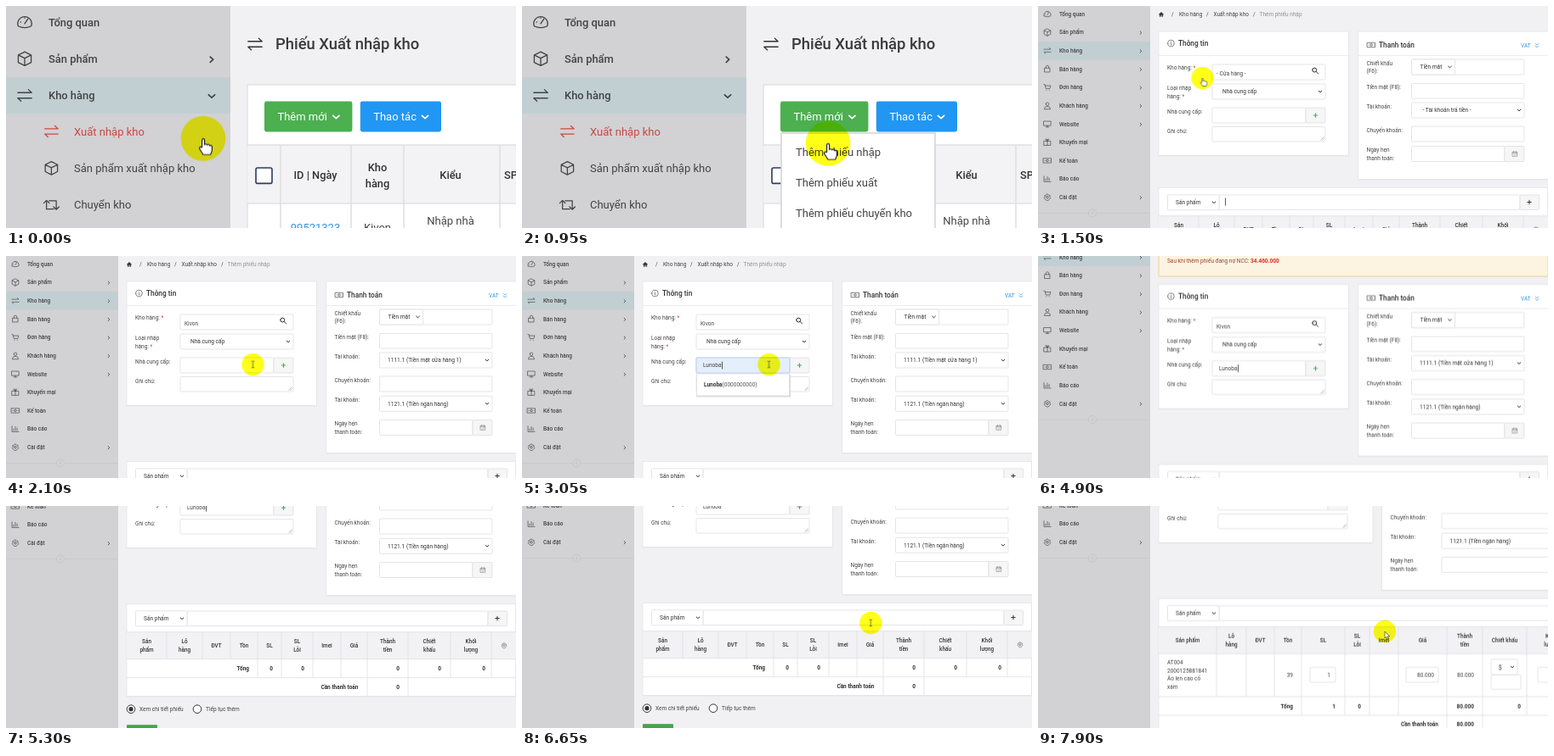
An HTML page that plays this animation: 600x262 px, repeating every 8000 ms.

```html
<!DOCTYPE html>
<html lang="vi">
<head>
<meta charset="utf-8">
<title>Phiếu nhập kho</title>
<style>
html, body { margin: 0; width: 100%; height: 100%; overflow: hidden; background: #f1f0f2; }
svg { display: block; width: 100%; height: 100%; }
text { font: 6.5px Roboto, sans-serif; fill: #444; white-space: pre; }
.menu { font-weight: 500; font-size: 6.45px; fill: #444; }
.title { font-size: 8.3px; font-weight: 500; fill: #333; }
.big { font-size: 9.2px; font-weight: 500; fill: #3a3a3a; }
.bold { font-weight: 700; fill: #333; }
.head { font-weight: 500; font-size: 6.4px; fill: #333; }
.choice { font-size: 6.6px; fill: #333; }
.red { fill: #c64a42; }
.blue { fill: #2f93e0; }
.faint { fill: #939397; }
.white { fill: #fff; }
.warn { fill: #98402f; }
.icon { fill: none; stroke: #444; stroke-width: .7; stroke-linecap: round; stroke-linejoin: round; }
.circle { fill: #ffff18; mix-blend-mode: multiply; }
.pointer path { fill: #fff; stroke: #222; stroke-width: .6; stroke-linejoin: round; }
</style>
</head>
<body>
<script>
const LOOP = 8000, STORE = 'Kivon', SUPPLIER = 'Lunoba';
const ICONS = {
  gauge: 'M-4 2.5A4.3 4.3 0 1 1 4 2.5Q0 4.5-4 2.5M0 1 2-2M-2.5 0h.1M0-2.6v.1',
  cube: 'M0-4.3 4-2.3V2.3L0 4.3-4 2.3V-2.3ZM-4-2.3 0-.3 4-2.3M0-.3V4.3',
  swap: 'M-4.3-1.7H4.3L2.3-3.6M4.3 1.7H-4.3L-2.3 3.6',
  bag: 'M-3.2-1.2H3.2V3.8H-3.2ZM-1.8-1.2V-2.6A1.8 1.8 0 0 1 1.8-2.6V-1.2',
  cart: 'M-4.3-3.5H-3L-1.8 1.5H3L4.2-2H-2.6M-1.2 3.3v.2M2.4 3.3v.2',
  user: 'M-1.9-2A1.9 1.9 0 1 1 1.9-2A1.9 1.9 0 1 1-1.9-2M-3.8 4Q-3.5 .8 0 .8T3.8 4Z',
  screen: 'M-4.3-3.4H4.3V2H-4.3ZM0 2V3.8M-2 3.8H2',
  gift: 'M-4-1.5H4V3.8H-4ZM0-1.5V3.8M0-1.5Q-4-4-1.5-4T0-1.5Q0-4 1.5-4T0-1.5',
  cash: 'M-4.8-2.8H4.8V2.8H-4.8ZM-1.4 0A1.4 1.4 0 1 1 1.4 0A1.4 1.4 0 1 1-1.4 0M-3.4 0h.2M3.2 0h.2',
  chart: 'M-4.2-3.5V3.5H4.3M-2.2 2V0M0 2V-2.8M2.2 2V-1.2',
  gear: 'M-1.4 0A1.4 1.4 0 1 1 1.4 0A1.4 1.4 0 1 1-1.4 0M0-4 1.3-2.9 3.4-2.2 3-.5 3.9 1 2.6 2.6 1 3.9H-1L-2.6 2.6-3.9 1-3-.5-3.4-2.2-1.3-2.9Z',
  loop: 'M-5-1.2-3.2-3-1.4-1.2M-3.2-3V2.7H1.5M5 1.2 3.2 3 1.4 1.2M3.2 3V-2.7H-1.5',
  info: 'M-4 0A4 4 0 1 1 4 0A4 4 0 1 1-4 0M0-.4V2M0-2v.1',
  home: 'M-3 0 0-3 3 0H2V2.6H.7V.8H-.7V2.6H-2V0Z',
  search: 'M-3.4-1A2.6 2.6 0 1 1 1.8-1A2.6 2.6 0 1 1-3.4-1M1.2 1 3.8 3.6',
  date: 'M-2.8-2.4H2.8V3H-2.8ZM-2.8-.9H2.8M-1.4-3.2V-2M1.4-3.2V-2M-1.1 1 -.2 1.8 1.3.2',
  right: 'M-.9-1.7 .9 0-.9 1.7', down: 'M-1.9-.9 0 .9 1.9-.9', left: 'M.6-1.2-.6 0 .6 1.2',
  twice: 'M-2-2.2 0-.4 2-2.2M-2 .6 0 2.4 2 .6', plus: 'M-2.3 0H2.3M0-2.3V2.3',
  grip: 'M-2 2 2-2M0 2 2 0'
};

function add(parent, tag, attrs = {}) {
  const node = document.createElementNS('http://www.w3.org/2000/svg', tag);
  for (const key in attrs) node.setAttribute(key, attrs[key]);
  return parent.appendChild(node);
}
const group = parent => add(parent, 'g');
const icon = (p, name, x, y, style = '', scale = .95) =>
  add(p, 'path', { class: 'icon', d: ICONS[name], transform: `translate(${x} ${y}) scale(${scale})`, style });
const rect = (p, x, y, x2, y2, fill, stroke = 'none', rx = 0) =>
  add(p, 'rect', { x, y, width: x2 - x, height: y2 - y, fill, stroke, rx, 'stroke-width': .8 });
const line = (p, d, stroke = '#e0dfe2') => add(p, 'path', { d, stroke, 'stroke-width': .8, fill: 'none' });
const field = (p, x, y, x2, y2 = y + 18, fill = '#fff') => rect(p, x, y, x2, y2, fill, '#dfdfe2', 1);

// y is the middle of the first line; a trailing "*" is red
function text(p, x, y, content, cls = '', anchor = 'start', gap = 9.6) {
  const node = add(p, 'text', { class: cls, 'text-anchor': anchor });
  content.split('\n').forEach((row, i) => {
    const span = add(node, 'tspan', { x, y: y + i * gap + 2.3 });
    span.textContent = row.replace('*', '');
    if (row.endsWith('*')) add(node, 'tspan', { class: 'red' }).textContent = '*';
  });
  return node;
}
function select(p, x, y, x2, content, tx) {
  field(p, x, y, x2);
  text(p, tx, y + 9, content, 'choice');
  icon(p, 'down', x2 - 6, y + 9, 'stroke:#222;stroke-width:1');
}
function panel(p, x, y, x2, y2) {
  rect(p, x, y + 1, x2, y2 + 1, '#e5e4e7');
  rect(p, x, y, x2, y2, '#fff', '#e4e3e6');
}

function track(node, prop, steps) {
  const frames = steps.map(([time, value, easing = 'linear']) => ({ offset: time / LOOP, [prop]: value, easing }));
  if (frames[0].offset > 0) frames.unshift({ ...frames[0], offset: 0 });
  if (frames.at(-1).offset < 1) frames.push({ ...frames.at(-1), offset: 1 });
  node.animate(frames, { duration: LOOP, iterations: Infinity });
}
// visible between each pair of times
function show(node, ...times) {
  const steps = times.map((time, i) => [time, i % 2 ? 0 : 1, 'step-end']);
  if (times[0] > 0) steps.unshift([0, 0, 'step-end']);
  track(node, 'opacity', steps);
}

function sidebar(p, open) {
  const items = [['Tổng quan', 'gauge'], ['Sản phẩm', 'cube', 1], ['Kho hàng', 'swap', 1], ['Bán hàng', 'bag', 1],
    ['Đơn hàng', 'cart', 1], ['Khách hàng', 'user', 1], ['Website', 'screen', 1], ['Khuyến mại', 'gift'],
    ['Kế toán', 'cash'], ['Báo cáo', 'chart'], ['Cài đặt', 'gear', 1]];
  rect(p, 0, 0, 132, 500, '#d2d1d3');
  rect(p, 0, 42, 132, 63.5, '#c1cfd3');
  items.slice(0, open ? 3 : 11).forEach(([name, mark, more], i) => {
    const y = 9.5 + 21.62 * i;
    icon(p, mark, 11, y);
    text(p, 25, y, name, 'menu');
    if (more) icon(p, open && i === 2 ? 'down' : 'right', 121, y + .5, 'stroke-width:.9');
  });
  if (open) {
    [['Xuất nhập kho', 'swap'], ['Sản phẩm xuất nhập kho', 'cube'], ['Chuyển kho', 'loop']].forEach(([name, mark], i) => {
      icon(p, mark, 26.7, 74 + 21.7 * i, i ? '' : 'stroke:#c64a42', .9);
      text(p, 40, 74 + 21.7 * i, name, i ? '' : 'red');
    });
  } else {
    line(p, 'M0 244.5H59M69 244.5H132', '#c9c8cb');
    add(p, 'circle', { cx: 64, cy: 244.5, r: 4.5, fill: 'none', stroke: '#c2c1c5', 'stroke-width': .7 });
    icon(p, 'left', 64, 244.5, 'stroke:#b3b3b6');
  }
}

function listPage(p) {
  rect(p, 0, 0, 600, 262, '#f1f0f2');
  sidebar(p, true);
  icon(p, 'swap', 146.5, 22.5, 'stroke:#333');
  text(p, 158.5, 23, 'Phiếu Xuất nhập kho', 'big');
  panel(p, 142, 46.5, 320, 200);
  [[152, 203.7, '#4caf50', 'Thêm mới'], [208.4, 256, '#2196f3', 'Thao tác']].forEach(([x, x2, fill, name]) => {
    rect(p, x, 56.3, x2, 74.2, fill, 'none', 1.2);
    text(p, x + 7.7, 65.2, name, 'white');
    icon(p, 'down', x2 - 9.5, 65.5, 'stroke:#fff;stroke-width:.9');
  });
  rect(p, 142, 82, 320, 116, '#f3f2f4');
  line(p, 'M142 82H320M142 116.5H320M161.5 82V140M203 82V140M234 82V140M290.5 82V140');
  rect(p, 147, 95.5, 156.5, 104.7, '#fff', '#2c3d5c', 1);
  text(p, 182, 99.7, 'ID | Ngày', 'head', 'middle');
  text(p, 218.5, 95, 'Kho\nhàng', 'head', 'middle');
  text(p, 261.5, 99.7, 'Kiểu', 'head', 'middle');
  text(p, 293, 99.7, 'SP', 'head');
  text(p, 182, 130.8, '99521323', 'blue', 'middle');
  text(p, 218.5, 130.8, STORE, '', 'middle');
  text(p, 261.5, 126.5, 'Nhập nhà\ncung cấp', '', 'middle');
  const menu = group(p);
  rect(menu, 152.5, 75, 243, 135, '#fff', '#d5d5d8');
  ['Thêm phiếu nhập', 'Thêm phiếu xuất', 'Thêm phiếu chuyển kho'].forEach((name, i) => text(menu, 161, 86 + 18 * i, name));
  show(menu, 450, LOOP);
}

function breadcrumb(p) {
  icon(p, 'home', 145, 10, 'fill:#333;stroke-width:.4');
  [[157, '/'], [166, 'Kho hàng'], [198, '/'], [206.5, 'Xuất nhập kho'], [253, '/'], [260.5, 'Thêm phiếu nhập', 'faint']]
    .forEach(([x, name, cls]) => text(p, x, 10, name, cls));
}

function table(p, top, cols, heads) {
  const body = top + 32;
  rect(p, 142, top, 640, body, '#f2f1f3');
  line(p, `M142 ${top}H640M142 ${body}H640`);
  heads.forEach((name, i) => {
    const lines = name.split('\n').length;
    text(p, (cols[i] + cols[i + 1]) / 2, top + (lines > 1 ? 11 : 15.8), name, 'head', 'middle');
    line(p, `M${cols[i + 1]} ${top}V${body}`);
  });
}
const number = (p, x, y, value, cls = 'bold') => text(p, x, y, value, cls, 'end');

function form(p, { paid, wide }) {
  const grow = paid ? 28 : 0, left = wide ? 212 : 205, leftEnd = wide ? 364 : 338;
  const x = wide ? 404.5 : 376.5, right = x + (wide ? 70.5 : 63), end = wide ? 625 : 572;

  panel(p, 142, 30, wide ? 394 : 365.5, 176.5);
  icon(p, 'info', 156.5, 44);
  text(p, 165, 44.2, 'Thông tin', 'title');
  line(p, `M142 58.5H${wide ? 394 : 365}`, '#e8e7ea');
  text(p, 152, 73, 'Kho hàng: *');
  field(p, left, 69, leftEnd);
  text(p, left + 5, 79.5, paid ? STORE : '- Cửa hàng -');
  icon(p, 'search', leftEnd - 12, 76.5, 'stroke:#222;stroke-width:1');
  text(p, 152, 97, 'Loại nhập\nhàng: *');
  select(p, left, 92, leftEnd, 'Nhà cung cấp', left + 12);
  text(p, 152, 125, 'Nhà cung cấp:');
  field(p, left, 120, leftEnd - 23);
  field(p, leftEnd - 23, 120, leftEnd, 138, '#f6f6f7');
  icon(p, 'plus', leftEnd - 11.5, 129, 'stroke:#4caf50;stroke-width:1.3');
  text(p, 152, 147.5, 'Ghi chú:');
  field(p, left, 142.5, leftEnd, 160);
  icon(p, 'grip', leftEnd - 3.5, 156.5, 'stroke:#999;stroke-width:.6');

  panel(p, x, 30, 610, 204.5 + grow);
  icon(p, 'cash', x + 15.5, 46);
  text(p, x + 24.5, 46.3, 'Thanh toán', 'title');
  text(p, 568, 46.5, 'VAT', 'blue');
  icon(p, 'twice', 587, 46.5, 'stroke:#2f93e0');
  line(p, `M${x} 58.5H600`, '#e8e7ea');
  const label = (y, name) => text(p, x + 10, y, name);
  label(67.3, 'Chiết khấu\n(F6):');
  field(p, right, 63, end);
  select(p, right, 63, right + 51, 'Tiền mặt', right + 10);
  label(96, 'Tiền mặt (F8):');
  field(p, right, 91.5, end, 109);
  label(119, 'Tài khoản:');
  select(p, right, 114, end, paid ? '1111.1 (Tiền mặt cửa hàng 1)' : '- Tài khoản trả tiền -', right + (paid ? 9.5 : 13));
  label(146.5, 'Chuyển khoản:');
  field(p, right, 142, end, 160);
  if (paid) {
    label(170, 'Tài khoản:');
    select(p, right, 165.3, end, '1121.1 (Tiền ngân hàng)', right + 9.5);
  }
  label(170 + grow, 'Ngày hẹn\nthanh toán:');
  field(p, right, 165.5 + grow, end - 23);
  field(p, end - 23, 165.5 + grow, end, 183.5 + grow, '#f6f6f7');
  icon(p, 'date', end - 11, 174.5 + grow, 'stroke:#777;stroke-width:.6');

  const top = 214.5 + grow;
  panel(p, 142, top, wide ? 640 : 599.5, top + 109 + (wide ? 60 : 0));
  field(p, 213, top + 8.5, wide ? 620 : 567, top + 26);
  select(p, 152.5, top + 8.3, 213, 'Sản phẩm', 162);
  if (!wide) {
    field(p, 567, top + 8.5, 589.5, top + 26, '#f6f6f7');
    icon(p, 'plus', 578, top + 17, 'stroke:#333;stroke-width:1.1');
  }
  (wide ? filledTable : emptyTable)(p, top + 33.2);
}

function emptyTable(p, y) {
  const cols = [142, 189, 231, 264, 296, 324, 361, 394, 425, 473, 523, 571, 600];
  table(p, y, cols, ['Sản\nphẩm', 'Lô\nhàng', 'ĐVT', 'Tồn', 'SL', 'SL\nLỗi', 'Imei', 'Giá', 'Thành\ntiền', 'Chiết\nkhấu', 'Khối\nlượng']);
  icon(p, 'gear', 586, y + 16, 'stroke:#777;stroke-width:1', .75);
  line(p, `M142 ${y + 54}H600` + cols.slice(4, 12).map(x => `M${x} ${y + 32}V${y + 54}`).join('') + `M425 ${y + 54}V${y + 76}M473 ${y + 54}V${y + 76}`);
  number(p, 286, y + 43, 'Tổng');
  [314, 351, 463, 512, 564].forEach(x => number(p, x, y + 43, '0'));
  number(p, 414.5, y + 64.5, 'Cần thanh toán');
  number(p, 463, y + 64.5, '0');

  [[147, 'Xem chi tiết phiếu'], [225, 'Tiếp tục thêm']].forEach(([x, name], i) => {
    add(p, 'circle', { cx: x, cy: y + 91, r: 4.8, fill: '#fff', stroke: '#333', 'stroke-width': 1 });
    if (!i) add(p, 'circle', { cx: x, cy: y + 91, r: 2.6, fill: '#333' });
    text(p, x + 10, y + 91, name);
  });
  rect(p, 142, y + 109.5, 178, y + 128, '#43a54b', 'none', 1);
}

function filledTable(p, y) {
  const cols = [142, 210, 245, 278, 310, 361, 390, 424, 481, 523, 575, 632];
  table(p, y, cols, ['Sản phẩm', 'Lô\nhàng', 'ĐVT', 'Tồn', 'SL', 'SL\nLỗi', 'Imei', 'Giá', 'Thành\ntiền', 'Chiết khấu', 'Khối\nlượng']);
  line(p, `M142 ${y + 82.5}H640M142 ${y + 104.5}H640M481 ${y + 104}V${y + 126}M523 ${y + 104}V${y + 126}`
    + cols.slice(1, 11).map((x, i) => `M${x} ${y + 32}V${y + (i < 3 ? 82.5 : 104.5)}`).join(''));
  text(p, 152, y + 42, 'AT004\n2000125881841\nÁo len cao cổ\nxám');
  number(p, 300, y + 56.5, '39', '');
  field(p, 320, y + 48, 350, y + 65.5);
  number(p, 344, y + 56.8, '1', '');
  field(p, 433, y + 48, 471, y + 65.5);
  number(p, 466, y + 56.8, '80.000', '');
  number(p, 513, y + 56.5, '80.000', '');
  select(p, 533, y + 38.5, 564, '$', 542);
  field(p, 533, y + 57, 568, y + 74);
  field(p, 588, y + 48, 622, y + 65.5);
  [[300, 'Tổng'], [350, '1'], [380, '0'], [513, '80.000'], [568, '0']].forEach(([x, value]) => number(p, x, y + 93.5, value));
  number(p, 471, y + 115, 'Cần thanh toán');
  number(p, 513, y + 115, '80.000');
}

function caret(p, x, y, ...times) {
  show(line(p, `M${x} ${y - 4.5}V${y + 4.5}`, '#333'), ...times);
}

function entryPage(p) {
  rect(p, 0, 0, 600, 500, '#f1f0f2');
  const page = group(p);
  sidebar(page, false);
  breadcrumb(page);
  const alert = group(page);
  rect(alert, 142, 30, 600, 75.5, '#fcf4e0', '#f0c583', 1.5);
  [[43, 'Hiện tại đang nợ NCC: '], [57.5, 'Sau khi thêm phiếu đang nợ NCC: ']].forEach(([y, name]) => {
    const amount = add(text(alert, 152, y, name, 'warn'), 'tspan', { style: 'font-weight:700;fill:#e02b2b' });
    amount.textContent = '34.460.000';
  });
  show(alert, 3550, LOOP);

  const content = group(page);
  track(content, 'transform', [[0, 'translateY(0)', 'step-end'], [3550, 'translateY(55px)', 'step-end'], [7650, 'translateY(49.7px)', 'step-end']]);
  [[{}, 0, 1850], [{ paid: true }, 1850, 7650], [{ paid: true, wide: true }, 7650, LOOP]].forEach(([options, from, to]) => {
    const view = group(content);
    form(view, options);
    show(view, from, to);
  });
  show(rect(content, 205, 120, 315, 138, '#e5eefb', '#a9c8ee', 1), 2350, 3500);
  [...SUPPLIER].forEach((_, i) => {
    const from = 2800 + 40 * i;
    show(text(content, 213, 129, SUPPLIER.slice(0, i + 1)), from, i < 5 ? from + 40 : 7650);
  });
  caret(content, 213.5, 129, 2350, 2600);
  caret(content, 235.5, 129, 3000, 3400, 3550, 4000, 4500, 5000, 5200, 5600);
  caret(content, 220.5, 231, 1250, 1850);
  caret(content, 220.5, 259, 6150, 6650);
  show(text(content, 220, 259, 'A'), 6850, 7650);
  caret(content, 228.5, 259, 6850, 7200, 7450, 7650);

  const hint = group(content);
  rect(hint, 205, 140, 316, 166.5, '#dcdbdf');
  rect(hint, 205.5, 139, 314.5, 165, '#fff', '#dcdbdf');
  add(text(hint, 214, 152, SUPPLIER, 'bold'), 'tspan', { style: 'font-weight:400;fill:#555' }).textContent = '(0000000000)';
  show(hint, 2950, 3500);

  track(page, 'transform', [[4680, 'translateY(0)', 'ease-in-out'], [5280, 'translateY(-182px)', 'step-end'], [5450, 'translateY(-183px)']]);
}

function cursor(p) {
  const path = [[150, 116, 78.2, 'ease-in-out'], [450, 180, 68], [650, 180, 68, 'ease-in-out'], [1100, 180, 85],
    [1250, 180, 85], [1500, 193.5, 85], [1550, 195, 85, 'ease-in-out'], [1700, 235, 80], [1800, 235, 88, 'ease-in'],
    [2050, 275, 128], [2100, 290.5, 128], [3180, 290.5, 128, 'ease-in-out'], [3400, 248, 151], [3500, 248, 151, 'ease-in-out'],
    [3850, 578.5, 113], [4400, 578.5, 113, 'ease-in'], [4550, 620, 120], [5380, 620, 120, 'ease-out'],
    [5500, 361, 122], [5600, 345, 127], [5740, 345, 127, 'ease-in-out'], [6050, 500, 127, 'ease-in-out'],
    [6500, 410.3, 138], [7430, 410.3, 138, 'ease-in-out'], [7700, 408, 148]];
  const steps = path.map(([time, x, y, easing]) => [time, `translate(${x}px,${y}px)`, easing]);
  const circle = add(p, 'circle', { class: 'circle', r: 13.2 });
  const pointer = add(p, 'g', { class: 'pointer' });
  [circle, pointer].forEach(node => track(node, 'transform', steps));
  const shape = (d, times, style = '') => show(add(pointer, 'path', { d, style }), ...times);
  shape('M-.7 5.2V.7Q0-.5.8.7V3.6Q1.6 2.8 2.3 3.8 3.2 3 3.8 4.2 5.2 3.6 5.2 5.2V7.2L4.3 9.5H0L-2.2 6Q-2.2 4.5-.7 5.2Z', [0, 2050, 3250, 3520]);
  shape('M-1.7-4Q0-4 0-3.2V3.2Q0 4-1.7 4M1.7-4Q0-4 0-3.2M0 3.2Q0 4 1.7 4', [2050, 3250, 5700, 7600], 'fill:none');
  shape('M0 0V8L1.9 6.3 3.1 9 4.5 8.4 3.3 5.8H5.9Z', [3520, 5700, 7600, LOOP]);
}

const svg = add(document.body, 'svg', { viewBox: '0 0 600 262', preserveAspectRatio: 'none' });
const camera = group(svg);
track(camera, 'transform', [[0, 'scale(2)'], [1250, 'scale(2)', 'ease-in-out'], [1480, 'scale(1)']]);
const list = group(camera), entry = group(camera);
listPage(list);
entryPage(entry);
show(list, 0, 1250);
show(entry, 1250, LOOP);
cursor(camera);
</script>
</body>
</html>
```
